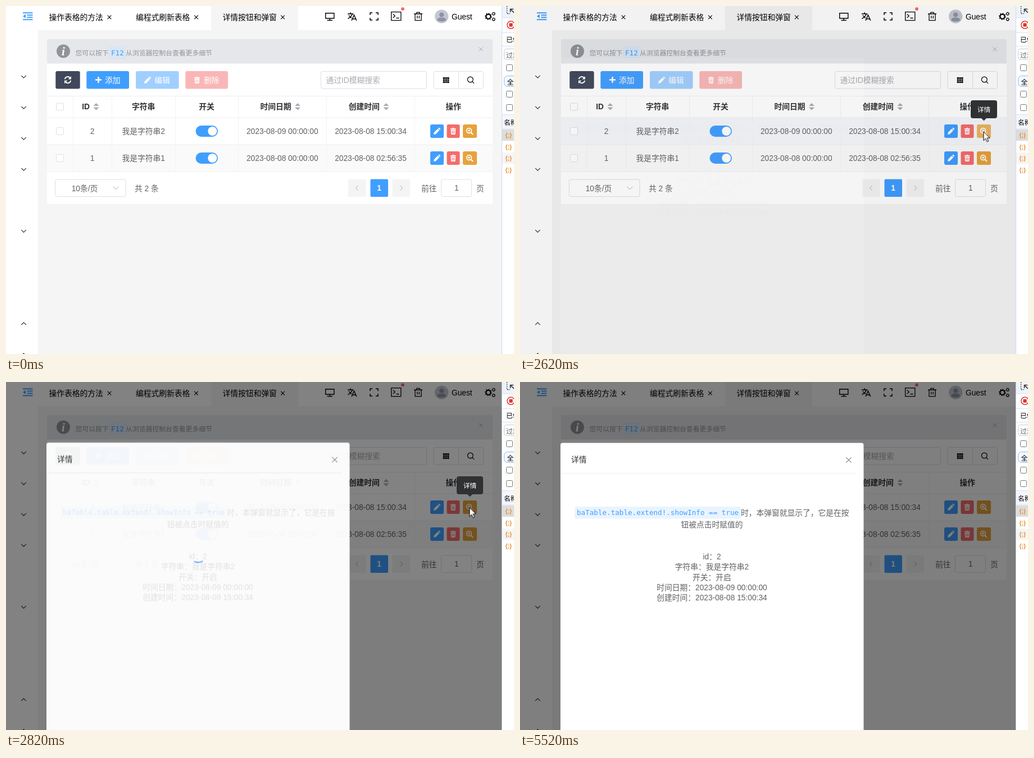
An HTML page that plays this animation: 904 px wide and 620 px high, repeating every 6.33 s.

```html
<!DOCTYPE html>
<html lang="zh-CN">
<head>
<meta charset="utf-8">
<title>详情按钮和弹窗</title>
<style>
html, body { margin: 0; width: 100%; height: 100%; overflow: hidden; background: #f5f5f5; }
svg { display: block; width: 100vw; height: 100vh; }
text { font: 13.75px "Liberation Sans", "Noto Sans CJK SC", "Noto Sans CJK", sans-serif; fill: #606266; white-space: pre; }
.mid { text-anchor: middle; }
.bold { font-weight: 700; fill: #303133; }
.small { font-size: 11.85px; }
.dark { fill: #000; }
.white { fill: #fff; }
.code { font: 12.6px "DejaVu Sans Mono", monospace; fill: #409eff; }
.json { font: 700 10.5px "Liberation Sans", sans-serif; fill: #e8912d; }
.line { fill: none; stroke: #000; stroke-width: 1.4; }
</style>
</head>
<body>
<svg id="stage" viewBox="0 0 904 620" xmlns="http://www.w3.org/2000/svg"></svg>
<script>
const LOOP = 6330;
const BLUE = '#409eff', RED = '#f56c6c', AMBER = '#e6a23c';

// Markup helpers; text is placed by its vertical centre
const rect = (x, y, w, h, fill, more = '') =>
  `<rect x="${x}" y="${y}" width="${w}" height="${h}" fill="${fill}" ${more}/>`;
const box = (x, y, w, h, stroke, rx = 3, fill = '#fff') =>
  rect(x, y, w, h, fill, `rx="${rx}" stroke="${stroke}"`);
const text = (x, y, s, cls = '', more = '') =>
  `<text x="${x}" y="${y + 5}" class="${cls}" ${more}>${s}</text>`;
const mid = (x, y, s, cls = '') => text(x, y, s, 'mid ' + cls);
const line = (d, stroke = '#000', w = 1.4, more = '') =>
  `<path d="${d}" class="line" style="stroke:${stroke};stroke-width:${w}" ${more}/>`;
const shape = (d, fill) => `<path d="${d}" fill="${fill}"/>`;
const circle = (x, y, r, fill, more = '') =>
  `<circle cx="${x}" cy="${y}" r="${r}" fill="${fill}" ${more}/>`;
const at = (x, y, s, id = '') => `<g ${id && `id="${id}"`} transform="translate(${x} ${y})">${s}</g>`;
const cross = (x, y, r, color, w = 1.1) =>
  line(`M${x - r} ${y - r}l${2 * r} ${2 * r}m0 ${-2 * r}l${-2 * r} ${2 * r}`, color, w);
const chevron = (x, y, dx, dy, color, w = 1.1) =>
  line(`M${x - dx} ${y - dy / 2}l${dx} ${dy} ${dx} ${-dy}`, color, w);

const pencil = (x, y) => at(x, y,
  shape('M-6 6L-5.2 2.2 1.2-4.2 4.2-1.2-2.2 5.2ZM2-5L3.2-6Q4-6.4 4.8-5.6L5.7-4.7Q6.4-4 5.8-3.2L5-2Z', '#fff'));
const bin = (x, y, back) => at(x, y,
  shape('M-5-5H-2L-1.3-6H1.3L2-5H5V-3.5H-5ZM-4.3-2.8H4.3L3.8 5Q3.7 6 2.8 6H-2.8Q-3.7 6-3.8 5Z', '#fff') +
  line('M-2-1V4.3M0-1V4.3M2-1V4.3', back, .9));
const zoom = (x, y) => at(x, y,
  line('M2 2L6 6', '#fff', 2.2) + circle(-1, -1, 4.4, 'none', 'stroke="#fff" stroke-width="1.7"') +
  line('M-3.2-1H1.2M-1-3.2V1.2', '#fff', 1.4));
const gear = (x, y, r) =>
  circle(x, y, r, 'none', `stroke="#000" stroke-width="${r * .5}"`) +
  circle(x, y, r * 1.35, 'none',
    `stroke="#000" stroke-width="${r * .45}" pathLength="16" stroke-dasharray="1 1"`);
const sorter = x => shape(`M${x - 5} 178l5-5 5 5zM${x - 5} 180.5h10l-5 5z`, '#a8abb2');
const check = y => box(89.5, y - 6.5, 13, 13, '#dcdfe6', 2);

function header() {
  const tabs = [[76.5, '操作表格的方法', 184], [231, '编程式刷新表格', 338.5], [385.5, '详情按钮和弹窗', 492.5]];
  return rect(0, 0, 57, 620, '#fff') + rect(57, 0, 825, 43, '#fff') + rect(365, 0, 155, 43, '#f5f5f5') +
    [126, 181, 236, 291, 401].map(y => chevron(31.5, y, 4.3, 4.3, '#303133')).join('') +
    [566, 621].map(y => chevron(31.5, y, 4.3, -4.3, '#303133')).join('') +
    line('M30 12.2H47.5M37.5 16.2H47.5M37.5 20.2H47.5M30 24.2H47.5', BLUE, 2) +
    shape('M30 18.2l5-3.6v7.2z', BLUE) +
    tabs.map(([x, s, c]) => text(x, 19.5, s, 'dark') + cross(c, 20, 3.3, '#000')).join('') +
    line('M568.7 12.7H583.8V22H568.7ZM576.2 22V25.5M571.5 25.5H581') +
    line('M608 14H618.5M613 11.2V14M616.5 14Q614.5 19.5 608.5 22.5M610 16.5Q612 20 615 21.5M615 26L619.4 16 623.8 26M616.5 23H622.3', '#000', 1.5) +
    line('M648 16V12H652M658 12H662V16M662 21V25H658M652 25H648V21', '#000', 1.5) +
    line('M685.7 10.7H702.8V25.6H685.7ZM688.8 14.5L692.3 17.8 688.8 21M694.5 21.5H699.5', '#000', 1.3) +
    circle(706, 5.2, 2.9, RED) +
    line('M726 14H741M730.8 14V11.3H736.2V14M728 14V25.6H739V14M731.8 17.3V22.3M735.3 17.3V22.3', '#000', 1.3) +
    circle(775.2, 18.6, 12.2, '#c3c7d1') + circle(775.2, 15.6, 4.2, '#8c93a3') +
    shape('M767.2 25.6Q768 20.8 772.5 20.8H778Q782.4 20.8 783.2 25.6Q775.2 30 767.2 25.6Z', '#8c93a3') +
    text(793, 18.5, 'Guest', 'dark') +
    gear(858.4, 18.7, 4) + gear(867.8, 13.8, 2.1) + gear(867.8, 23.8, 2.1);
}

function alertBar() {
  return rect(73, 59, 793, 44, '#e6e7eb', 'rx="3"') + circle(102, 80.5, 12, '#909399') +
    '<text x="102" y="87.5" class="mid white" style="font:italic 700 21px \'Liberation Serif\',serif">i</text>' +
    rect(183, 72, 30, 22, '#d9e6f4', 'rx="2"') +
    text(123.5, 82.5, '您可以按下', 'small', 'style="fill:#909399"') + text(187, 82.5, 'F12', 'code') +
    text(213, 82.5, '从浏览器控制台查看更多细节', 'small', 'style="fill:#909399"') +
    cross(845, 77, 3.5, '#a8abb2', 1);
}

function toolbar() {
  let grid = '';
  for (let i = 0; i < 9; i++) grid += rect(777.7 + i % 3 * 3.8, 127 + (i / 3 | 0) * 3.6, 3.2, 2.9, '#000');
  const button = (x, w, fill) => rect(x, 116, w, 31.5, fill, 'rx="3"');
  return button(88.3, 43.4, '#40485b') + button(143.3, 75.7, BLUE) +
    button(231, 76.6, '#a0cfff') + button(319.3, 75.7, '#fab6b6') +
    line('M104.8 130.3A5.3 5.3 0 0 1 114 127.8M115.2 132.9A5.3 5.3 0 0 1 106 135.4', '#fff', 1.9) +
    shape('M116 125V130.4H110.6ZM104 138.2V132.8H109.4Z', '#fff') +
    line('M159 131.5H170M164.5 126V137', '#fff', 2.4) + pencil(252, 132) + bin(340, 132, '#fab6b6') +
    text(176, 131.5, '添加', 'white') + text(264.3, 131.5, '编辑', 'white') + text(352, 131.5, '删除', 'white') +
    box(560.5, 116.5, 188, 30.5, '#dcdfe6') + text(569.5, 131.5, '通过ID模糊搜索', '', 'style="fill:#a8abb2"') +
    box(761, 116.5, 88.5, 30.5, '#dcdfe6') + line('M805.5 116.5V147', '#dcdfe6', 1) + grid +
    circle(826.3, 131, 4.9, 'none', 'stroke="#000" stroke-width="1.2"') + line('M829.8 134.6L833 137.8', '#000', 1.2);
}

function row(id, y, date, made, fill) {
  return rect(73, y - 23.5, 793, 47.5, fill, `id="row${id}"`) + check(y) + mid(153.5, y, id) +
    mid(244.7, y, '我是字符串' + id) + rect(337.5, y - 10, 39.5, 20, BLUE, 'rx="10"') + circle(367.3, y, 8, '#fff') +
    mid(491.8, y, date) + mid(649, y, made) +
    rect(755, y - 12, 24, 24, BLUE, 'rx="3"') + rect(784.5, y - 12, 23, 24, RED, 'rx="3"') +
    rect(813, y - 12, 25, 24, AMBER, `id="more${id}" rx="3"`) +
    pencil(767, y) + bin(795.8, y, RED) + zoom(825, y);
}

function table() {
  const heads = [[244.7, '字符串'], [357, '开关'], [480, '时间日期'], [637.3, '创建时间'], [796.3, '操作']];
  return rect(73, 102.5, 793, 250, '#fff') + toolbar() + check(179.5) +
    mid(142, 179, 'ID', 'bold') + heads.map(([x, s]) => mid(x, 179, s, 'bold')).join('') +
    [160.5, 519, 676.5].map(sorter).join('') +
    row(2, 223, '2023-08-09 00:00:00', '2023-08-08 15:00:34', '#fff') +
    row(1, 271, '2023-08-08 00:00:00', '2023-08-08 02:56:35', '#fafafa') +
    line('M73 160.5H866M73 199H866M73 247H866M73 295H866', '#ebeef5', 1) +
    line([119.5, 188.5, 301.5, 413.5, 570.5, 727.5].map(x => `M${x} 160V295`).join(''), '#f1f3f7', 1);
}

function pager() {
  return box(87.5, 309, 125.5, 30.5, '#dcdfe6') + mid(140, 325, '10条/页') + chevron(195.5, 324.3, 5, 5, '#a8abb2', 1) +
    text(229, 325, '共 2 条') +
    rect(609, 308.5, 31.5, 31.5, '#f4f4f5', 'rx="2"') + rect(648.5, 308.5, 31.5, 31.5, BLUE, 'rx="2"') +
    rect(687.5, 308.5, 31.5, 31.5, '#f4f4f5', 'rx="2"') +
    line('M626.5 320L622.5 324.2 626.5 328.4M701.7 320L705.7 324.2 701.7 328.4', '#a8abb2', 1) +
    mid(664.2, 324, '1', 'bold white" style="fill:#fff') +
    text(739, 325, '前往') + box(774.5, 309, 54, 30.5, '#dcdfe6') + mid(801.8, 324, '1') + text(837, 325, '页');
}

function devtools() {
  const tick = y => box(890.5, y - 5.5, 11, 11, '#767676', 2);
  return rect(882, 0, 22, 620, '#fff') + rect(882, 0, 22, 21, '#eef2fa') +
    line('M882 21H904M882 47.5H904M882 71.5H904', '#d6e2f6', 1) +
    line('M891.5 0V13', '#444', 1.3, 'stroke-dasharray="2 1.6"') + line('M892 13.5H897', '#444', 1.3, 'stroke-dasharray="2 1.6"') +
    line('M904 12L897.5 5.5M897.5 11V5.5H903', '#333', 1.6) +
    circle(898.5, 33.7, 6.6, '#fff', 'stroke="#dc362e" stroke-width="1.5"') + rect(895.4, 30.6, 6.2, 6.2, '#dc362e') +
    text(890, 59, '已停', 'small dark') +
    box(886.5, 76.5, 40, 19, '#c3cad6', 4) + text(890, 86.5, '过滤', 'small') + tick(110) +
    box(886.5, 124.5, 40, 19, '#8fb8f5', 6, '#f3f8ff') + text(891.5, 134.5, '全部', 'small dark') + tick(157) + tick(181) +
    rect(882, 194, 22, 25, '#f3f6fc') + line('M882 193.5H904M882 219H904', '#d6e2f6', 1) + text(886, 207, '名称', 'small dark') +
    [230, 251, 271.5, 292].map((y, i) =>
      rect(882, y - 10.3, 22, 20.6, ['#dcdcdc', '#fff', '#f5f5f5', '#fff'][i]) +
      `<text x="894.3" y="${y + 3.5}" class="mid json">{;}</text>`).join('') +
    rect(882, 0, 1, 620, '#cddaf3');
}

function modal() {
  const info = ['id：2', '字符串：我是字符串2', '开关：开启', '时间日期：2023-08-09 00:00:00', '创建时间：2023-08-08 15:00:34'];
  return `<g id="modal">${rect(0, 0, 882, 620, '#000', 'opacity=".5"')}<g id="dialog">` +
    rect(72, 108.5, 539.5, 540, '#fff', 'rx="4"') + text(91, 138.3, '详情', '', 'style="fill:#303133"') +
    cross(585, 139, 4.7, '#7d828b', 1.1) + line('M72 162.5H597', '#ebeef5', 1) + '<g id="detail">' +
    rect(97.5, 222, 295.5, 21.5, '#e9f4ff', 'rx="2"') +
    text(101, 232.3, 'baTable.table.extend!.showInfo == true', 'code') +
    text(393, 232.5, '时，本弹窗就显示了，它是在按') + mid(341.5, 253.5, '钮被点击时赋值的') +
    info.map((s, i) => mid(341.5, 311 + i * 18.25, s)).join('') + '</g>' +
    at(342, 305, '<g transform="scale(.84)"><g id="spinner">' +
      circle(0, 0, 20, 'none', `id="arc" stroke="${BLUE}" stroke-width="2" stroke-linecap="round"`) + '</g></g>') +
    '</g></g>';
}

const tooltip = `<g id="tip">${rect(802, 168, 47, 32, '#303133', 'rx="4"')}` +
  shape('M820.5 199.5h10l-5 5z', '#303133') + mid(825.5, 183.5, '详情', 'small white') + '</g>';
const pointer = '<g id="cursor"><path d="M.5.5V16.2L4.1 12.7 6.6 18.4 9.2 17.2 6.7 11.7H11.6Z" fill="#fff" stroke="#000"/></g>';

const $ = id => document.getElementById(id);
$('stage').innerHTML = header() + alertBar() + table() + pager() + modal() + tooltip + devtools() + pointer;

// rows: [time in ms, style]; each style holds until the next unless eased
function play(id, rows, easing = 'step-end') {
  const frames = rows.map(([t, css, ease = easing]) => ({ offset: t / LOOP, easing: ease, ...css }));
  frames.push({ ...frames[frames.length - 1], offset: 1 });
  $(id).animate(frames, { duration: LOOP, iterations: Infinity });
}
const fade = (id, rows) => play(id, rows.map(([t, opacity]) => [t, { opacity }]));
const fill = (id, rows) => play(id, rows.map(([t, color]) => [t, { fill: color }]));

// Cursor: in from the right, rest on the button, out at the bottom
const spot = (t, x, y, opacity = 1) => [t, { opacity, transform: `translate(${x}px, ${y}px)` }];
const path = [spot(0, 879, 403, 0)];
for (let k = 0; k <= 10; k++) {
  const u = k / 10, e = u * u * (3 - 2 * u);
  const t = k === 0 ? 1060 : k === 10 ? 1740 : 1050 + 70 * k;
  path.push(spot(t, 879 - 54.5 * e, 403 - 179.5 * e));
}
for (let k = 0; k < 10; k++) {
  const e = ((k + 1) / 10) ** 1.5;
  path.push(spot(4790 + k * 200 / 3, 824.5 + 44.5 * e, 223.5 + 383.5 * e));
}
path.push(spot(5460, 874, 615), spot(5520, 874, 620, 0));
play('cursor', path);

fill('row1', [[0, '#fafafa'], [1470, '#f5f7fa'], [1610, '#fafafa']]);
fill('row2', [[0, '#fff'], [1610, '#f9fafc'], [1680, '#f5f7fa'], [2690, '#fff']]);
fill('more2', [[0, AMBER], [1680, '#ebb563'], [2420, '#cf9236'], [2550, '#ebb563'], [2690, AMBER]]);
fade('tip', [[0, 0], [1680, .15], [1740, .7], [1810, 1], [2890, .6], [2960, .25], [3020, 0]]);

fade('modal', [[0, 0], [2620, .1], [2690, .42], [2760, .8], [2820, .98], [2890, 1]]);
play('dialog', [[0, 0, 0], [2620, .2, .2], [2690, .5, .45], [2760, .8, .8], [2820, .97, .975], [2890, 1, 1]]
  .map(([t, opacity, p]) => [t, { opacity, transform: `translateY(${20 * p - 20}px)` }]));
fade('detail', [[0, 1], [2690, .6], [2760, .35], [2820, .16], [2890, .1], [3790, .55], [3860, 1]]);

// Loading ring: steady turn plus a growing arc
play('spinner', [
  [0, { transform: 'rotate(0deg)', opacity: 0 }],
  [2595, { transform: 'rotate(0deg)', opacity: 0 }, 'linear'],
  [2820, { transform: 'rotate(40.5deg)', opacity: 1 }, 'linear'],
  [3720, { transform: 'rotate(202.5deg)', opacity: 1 }, 'linear'],
  [3855, { transform: 'rotate(226.8deg)', opacity: 0 }]
]);
const dash = (len, gap, offset) => ({ strokeDasharray: `${len}px, ${gap}px`, strokeDashoffset: `${offset}px` });
play('arc', [
  [0, dash(1, 200, 0)],
  [2595, dash(1, 200, 0), 'ease-in-out'],
  [3345, dash(90, 150, -40), 'ease-in-out'],
  [4095, dash(90, 150, -120)]
]);
</script>
</body>
</html>
```
